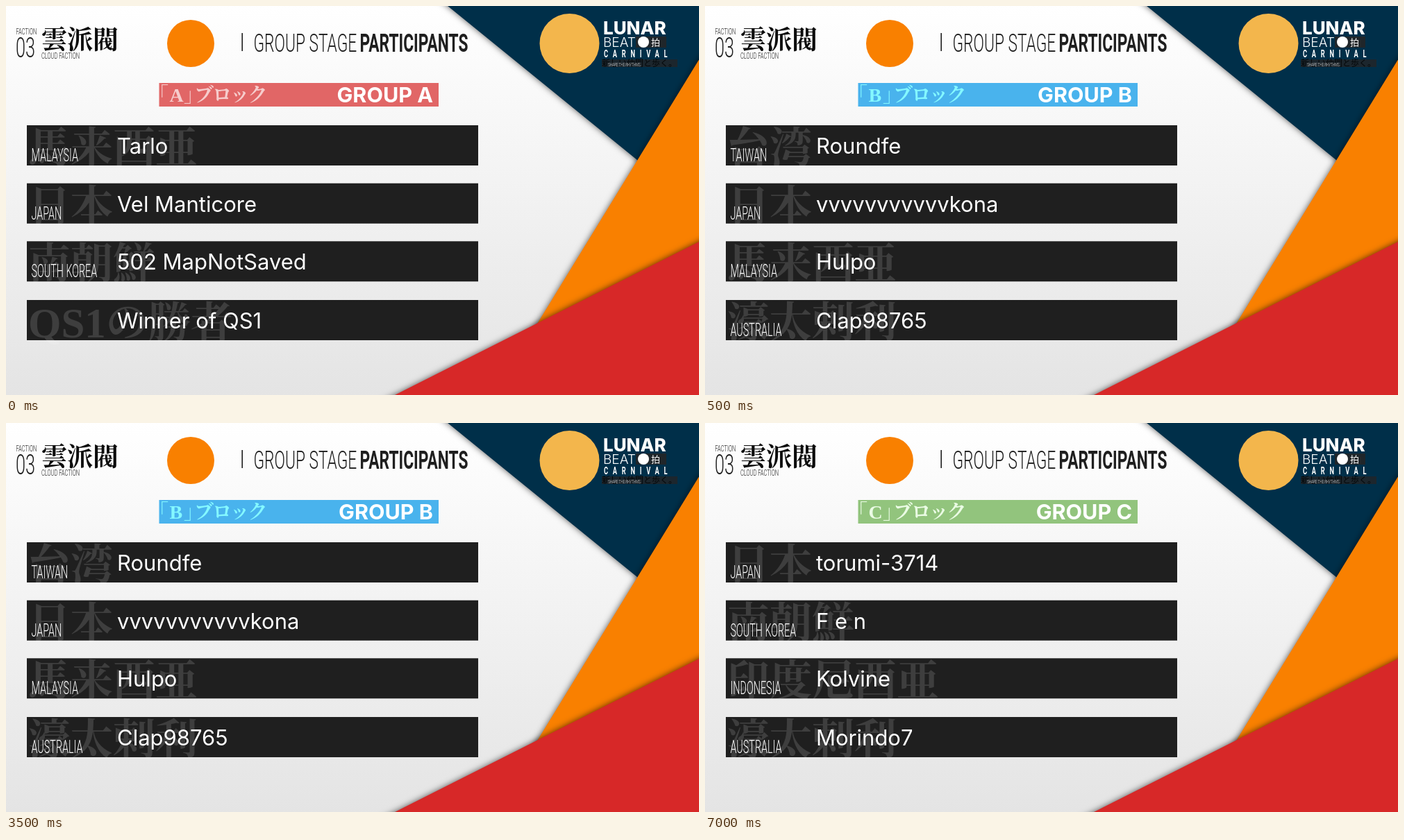
Recreate the animation shown at these times as an HTML page with a canvas. Size 998 by 561 pixels, loop 8 s.

```html
<!DOCTYPE html>
<html lang="en">
<head>
<meta charset="utf-8">
<title>Group stage participants</title>
<style>
  html, body { margin: 0; width: 100%; height: 100%; overflow: hidden; background: #fff; }
  canvas, svg { position: absolute; left: 0; top: 0; width: 998px; height: 561px; }
  .name { font: 400 31px Inter, sans-serif; }
  .group { font: 700 30.5px Inter, sans-serif; text-anchor: end; }
  .block { font: 600 28px "Liberation Serif", "Noto Serif CJK JP", "Noto Sans CJK JP", "Noto Sans CJK", serif; }
  .end { text-anchor: end; }
  .ghost { font: 700 61px "Liberation Serif", "Noto Serif CJK JP", "Noto Sans CJK JP", "Noto Sans CJK", serif; }
  .kanji { font: 700 37px "Noto Serif CJK JP", "Noto Sans CJK JP", "Noto Sans CJK", serif; }
  .thin { font-family: Roboto, sans-serif; font-weight: 300; }
  .fat { font-family: Roboto, sans-serif; font-weight: 700; }
  .mark { font: 800 26px Inter, sans-serif; }
  .soft { font: 300 19px Inter, sans-serif; }
  .tiny { font-family: "Noto Sans CJK JP", "Noto Sans CJK", sans-serif; }
</style>
</head>
<body>
<canvas id="stage" width="998" height="561"></canvas>
<svg id="words" viewBox="0 0 998 561" lang="ja"><g id="fixed"></g><g id="live"></g></svg>
<script>
const ctx = document.getElementById('stage').getContext('2d');
const fixed = document.getElementById('fixed');
const live = document.getElementById('live');

const INK = '#1f1f1f', ORANGE = '#f98000', RED = '#d72828', NAVY = '#002f49';
const NARROW = 0.615, SLIM = 0.575;
const LOOP = 8000;
const ROWS = [172, 255.7, 339.3, 424];

const LANDS = {
  MALAYSIA: '馬来西亜', JAPAN: '日本', 'SOUTH KOREA': '南朝鮮',
  TAIWAN: '台湾', AUSTRALIA: '濠太剌利', INDONESIA: '印度尼西亜'
};

const GROUPS = [
  { until: 500, letter: 'A', band: '#e16666', tint: '#f6cccc', players: [
    ['MALAYSIA', 'Tarlo'], ['JAPAN', 'Vel Manticore'],
    ['SOUTH KOREA', '502 MapNotSaved'], ['', 'Winner of QS1', 'QS1の勝者']] },
  { until: 5500, letter: 'B', band: '#49b3ed', tint: '#84f8ff', players: [
    ['TAIWAN', 'Roundfe'], ['JAPAN', 'vvvvvvvvvvvkona'],
    ['MALAYSIA', 'Hulpo'], ['AUSTRALIA', 'Clap98765']] },
  { until: LOOP, letter: 'C', band: '#92c47d', tint: '#eafbe4', players: [
    ['JAPAN', 'torumi-3714'], ['SOUTH KOREA', 'F e n'],
    ['INDONESIA', 'Kolvine'], ['AUSTRALIA', 'Morindo7']] }
];

function say(parent, x, y, str, cls, fill, { size, narrow = 1, gap = 0, alpha = 1 } = {}) {
  const el = document.createElementNS('http://www.w3.org/2000/svg', 'text');
  el.setAttribute('class', cls);
  el.setAttribute('fill', fill);
  el.setAttribute('fill-opacity', alpha);
  el.setAttribute('transform', `translate(${x} ${y}) scale(${narrow} 1)`);
  if (size) el.style.fontSize = size + 'px';
  if (gap) el.style.letterSpacing = gap + 'px';
  el.textContent = str;
  parent.append(el);
}

function box(x, y, w, h, fill) {
  ctx.fillStyle = fill;
  ctx.fillRect(x, y, w, h);
}

function dot(x, y, r, fill) {
  ctx.fillStyle = fill;
  ctx.beginPath();
  ctx.arc(x, y, r, 0, Math.PI * 2);
  ctx.fill();
}

// A sheet of paper with a soft shadow around it
function sheet(points, fill) {
  ctx.save();
  ctx.shadowColor = 'rgba(0,0,0,0.65)';
  ctx.shadowBlur = 10;
  ctx.fillStyle = fill;
  ctx.beginPath();
  points.forEach(([x, y]) => ctx.lineTo(x, y));
  ctx.fill();
  ctx.restore();
}

function drawScene(group) {
  const paper = ctx.createLinearGradient(0, 0, 0, 561);
  paper.addColorStop(0, '#ffffff');
  paper.addColorStop(1, '#e4e4e4');
  box(0, 0, 998, 561, paper);

  sheet([[611.6, -20], [1020, -20], [1020, 240], [931, 240]], NAVY);
  sheet([[1009.8, 58], [1040, 58], [1040, 480], [751.7, 480]], ORANGE);
  sheet([[520.4, 581], [1020, 581], [1020, 328.9]], RED);

  dot(266, 54, 34, ORANGE);
  box(339.4, 39, 1.6, 26, INK);
  dot(811.5, 54, 43, '#f3b64c');
  box(907, 44, 44, 16, '#20262a');
  dot(918, 52, 8, '#fff');
  box(858, 77, 109, 11, '#1c262d');

  box(220.5, 111, 402.5, 34, group.band);
  ROWS.forEach(y => box(30, y, 650, 58, INK));
}

function writeFixed() {
  say(fixed, 14.5, 41, 'FACTION', 'thin', INK, { size: 13, narrow: SLIM });
  say(fixed, 14, 73.5, '03', 'thin', INK, { size: 41, narrow: NARROW });
  say(fixed, 51, 61.5, '雲派閥', 'kanji', '#0c0c0c');
  say(fixed, 51, 75.5, 'CLOUD FACTION', 'thin', INK, { size: 13, narrow: SLIM });
  say(fixed, 356.5, 65.5, 'GROUP STAGE', 'thin', INK, { size: 37, narrow: NARROW });
  say(fixed, 509.5, 65.5, 'PARTICIPANTS', 'fat', INK, { size: 37, narrow: NARROW });

  say(fixed, 860, 41, 'LUNAR', 'mark', '#fff');
  say(fixed, 860, 59, 'BEAT', 'soft', '#fff');
  say(fixed, 929, 57, '拍', 'tiny', '#fff', { size: 13 });
  say(fixed, 861, 74, 'CARNIVAL', 'fat', '#fff', { size: 15, narrow: NARROW, gap: 11 });
  say(fixed, 858, 87, '新しい仲間と歩く。', 'tiny', '#05080a', { size: 12 });
  say(fixed, 867, 87, 'SHARE THE RHYTHMS.', 'thin', '#fff', { size: 8, narrow: SLIM });
}

function writeGroup({ letter, tint, players }) {
  live.replaceChildren();
  say(live, 234, 138, '「', 'block end', tint);
  say(live, 235.5, 138, letter, 'block', tint);
  say(live, 256, 138, '」', 'block', tint);
  say(live, 271, 138, 'ブロック', 'block', tint, { gap: -2 });
  say(live, 615, 138.7, 'GROUP ' + letter, 'group', '#fff');

  players.forEach(([land, name, ghost = LANDS[land]], i) => {
    const y = ROWS[i];
    say(live, 32, y + 54, ghost, 'ghost', '#fff', { alpha: 0.14 });
    say(live, 36.5, y + 52, land, 'thin', '#fff', { size: 25, narrow: SLIM });
    say(live, 160, y + 41, name, 'name', '#fff');
  });
}

let shown = null;
const start = performance.now();

function tick() {
  const t = (performance.now() - start) % LOOP;
  const group = GROUPS.find(g => t < g.until);
  if (group !== shown) {
    shown = group;
    drawScene(group);
    writeGroup(group);
  }
  requestAnimationFrame(tick);
}

writeFixed();
tick();
</script>
</body>
</html>
```
